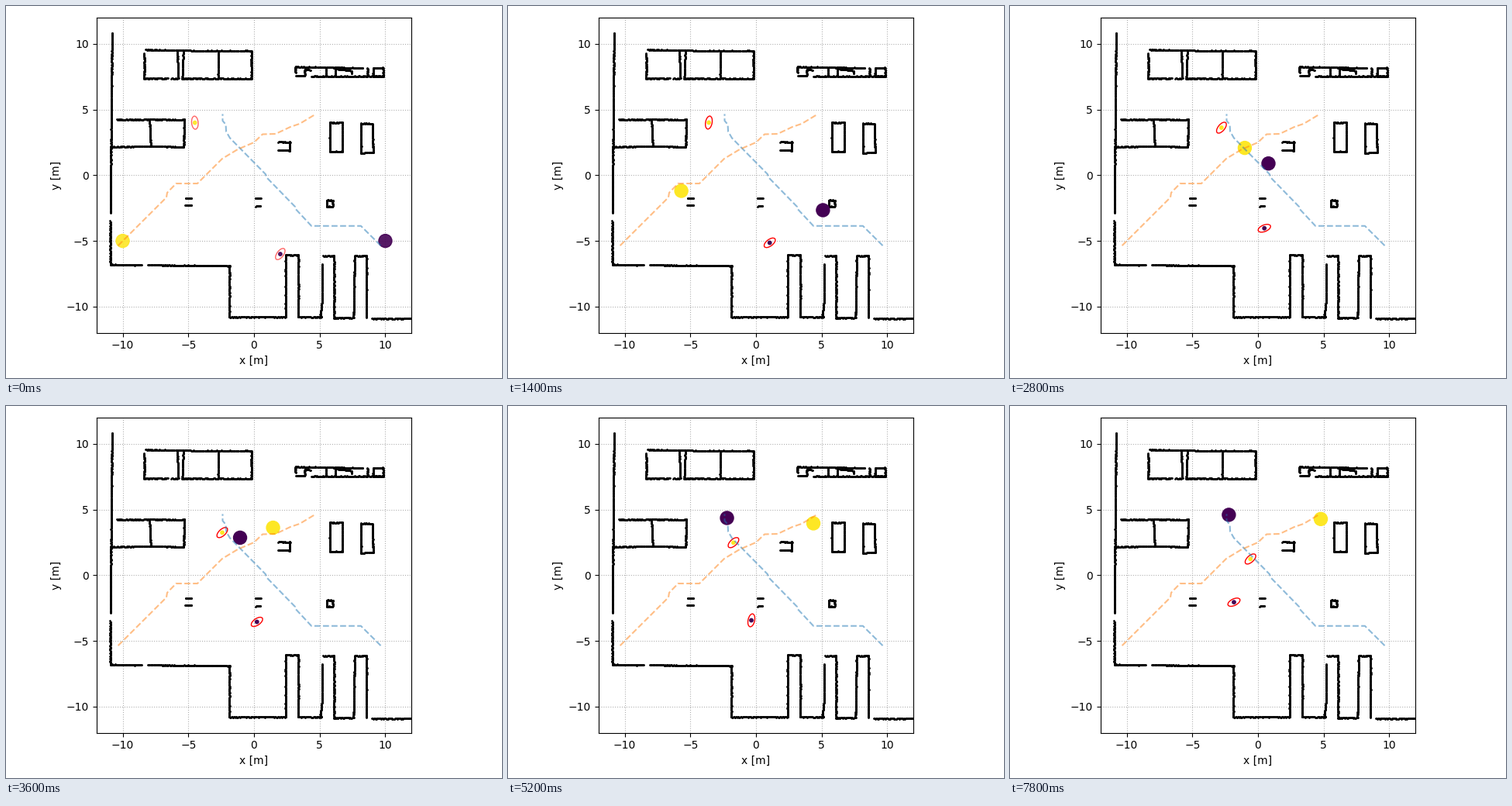
These frames come from a looping animation (640x480 px, 8000 ms). A matplotlib script:

```python
import numpy as np
import matplotlib.pyplot as plt
from matplotlib.animation import FuncAnimation
from matplotlib.patches import Ellipse

FRAMES, STEP = 40, 200
DT = STEP / 1000
TIMES = np.arange(FRAMES) * DT
COLORS = ["#440154", "#fde725"]
rng = np.random.default_rng(4)

fig, ax = plt.subplots(figsize=(6.4, 4.8), dpi=100)
ax.set(xlim=(-12, 12), ylim=(-12, 12), xlabel="x [m]", ylabel="y [m]",
       xticks=range(-10, 11, 5), yticks=range(-10, 11, 5), aspect="equal")
ax.grid(linestyle=":")
ax.set_axisbelow(True)
fig.tight_layout()


# Map: walls are rows of scan dots with a little noise, in metres.
def wall(*corners):
    for a, b in zip(corners, corners[1:]):
        n = int(np.hypot(b[0] - a[0], b[1] - a[1]) / 0.05) + 2
        dots = np.linspace(a, b, n) + rng.normal(0, 0.01, (n, 2))
        ax.scatter(*dots.T, s=1, color="black", zorder=1)


def box(x0, y0, x1, y1):
    wall((x0, y0), (x1, y0), (x1, y1), (x0, y1), (x0, y0))


def rows(x0, x1, *ys):
    for y in ys:
        wall((x0, y), (x1, y))


def outer_walls():
    wall((-10.8, 10.85), (-10.85, 6.4), (-10.93, -2.84))
    wall((-10.94, -3.49), (-10.94, -6.8), (-8.53, -6.84))
    wall((-8.08, -6.84), (-1.87, -6.89), (-1.87, -10.8), (2.4, -10.8),
         (2.4, -6.08), (3.38, -6.08), (3.38, -10.8), (5.13, -10.8),
         (5.05, -10.6), (5.2, -9.5), (5.2, -6.76))
    wall((5.25, -6.14), (6.1, -6.14), (6.1, -10.86), (7.58, -10.86),
         (7.67, -6.14), (8.57, -6.14), (8.57, -10.86))
    rows(9.0, 11.92, -10.92)


def left_rooms():
    wall((-8.25, 9.55), (-5.2, 9.53), (-4.7, 9.48), (-0.2, 9.48),
         (-0.2, 7.36), (-5.5, 7.37))
    wall((-8.35, 9.29), (-8.35, 7.37), (-6.55, 7.37))
    rows(-6.3, -5.75, 7.37)
    for top, bottom in ((-5.83, -5.78), (-5.37, -5.46), (-2.7, -2.74)):
        wall((top, 9.45), (bottom, 7.4))
    wall((-10.45, 4.24), (-5.3, 4.24), (-5.36, 2.15), (-7.86, 2.21),
         (-10.9, 2.17))
    wall((-7.96, 4.15), (-7.86, 2.25))


def right_rooms():
    wall((3.15, 7.8), (3.15, 8.26), (8.29, 8.16))
    wall((3.2, 7.56), (3.86, 7.56), (3.86, 8.1), (4.3, 8.02))
    rows(4.37, 9.83, 7.54)
    box(9.07, 7.53, 9.83, 8.17)
    for x in (5.5, 6.2, 8.64):
        wall((x, 8.17), (x, 7.56))
    wall((6.2, 8.1), (7.43, 7.95), (7.43, 7.75))
    box(5.78, 1.8, 6.72, 4.01)
    wall((8.14, 3.94), (9.0, 3.94), (9.08, 1.75), (8.16, 1.68),
         (8.14, 3.94))
    wall((1.83, 2.53), (2.73, 2.53), (2.73, 1.88), (1.8, 1.91))


def pillars():
    rows(-5.22, -4.75, -1.75, -2.28)
    rows(0.11, 0.5, -1.76, -2.35)
    box(5.53, -2.39, 5.99, -1.9)


def planned_path(color, *points):
    ax.plot(*zip(*points), color=color, ls="--", alpha=0.5, zorder=2)


# Robots: smooth curves through (seconds, x, y), coming to rest at the last.
def robot(*keys):
    t, *coords = np.array(keys).T
    clock = np.minimum(TIMES, t[-1])
    i = np.clip(np.searchsorted(t, clock, "right") - 1, 0, len(t) - 2)
    h = t[i + 1] - t[i]
    u = (clock - t[i]) / h

    def curve(v):
        m = np.gradient(v, t)
        m[-1] = 0
        return ((1 + 2 * u) * (1 - u) ** 2 * v[i] + u ** 2 * (3 - 2 * u) * v[i + 1]
                + h * u * (1 - u) * ((1 - u) * m[i] - u * m[i + 1]))

    return np.column_stack([curve(v) for v in coords])


# Walkers: speed and heading summed over time; the ring lies across the heading.
def walker(start, speed, turns):
    fine = np.arange(FRAMES * 20) * DT / 20
    heading = np.interp(fine, *zip(*turns))
    step = speed(fine) * DT / 20
    angle = np.radians(heading)
    moves = np.column_stack([step * np.cos(angle), step * np.sin(angle)])
    path = start + np.cumsum(moves, axis=0) - moves[0]
    return path[::20], heading[::20] + 90


def steady(t):
    return np.full_like(t, 0.65)


def hesitant(t):
    return 0.92 - 0.6 * np.exp(-((t - 4.5) / 1.3) ** 2)


outer_walls()
left_rooms()
right_rooms()
pillars()
planned_path("C0", (9.65, -5.36), (8.14, -3.86), (4.37, -3.86),
             (3.13, -2.53), (3.13, -2.4), (0.94, -0.15), (0.88, 0.08),
             (-1.83, 2.83), (-2.12, 3.33), (-2.15, 3.86), (-2.39, 4.15),
             (-2.39, 4.66))
planned_path("C1", (-10.35, -5.36), (-6.67, -1.69), (-6.61, -1.33),
             (-5.93, -0.63), (-4.31, -0.63), (-2.42, 1.26), (-1.24, 1.97),
             (0, 2.5), (0.65, 3.12), (1.65, 3.15), (2.77, 3.68),
             (3.48, 3.92), (4.66, 4.63))

robots = [
    robot((0, 10, -5), (0.8, 7.14, -3.84), (2, 3.19, -1.3),
          (3.6, -1.06, 2.86), (4.8, -2.18, 4.19), (5.2, -2.21, 4.36),
          (6.2, -2.22, 4.6)),
    robot((0, -10, -5), (0.8, -7.61, -2.6), (2, -3.72, 0.08),
          (3.6, 1.45, 3.62), (4.8, 4.0, 3.87), (5.2, 4.37, 3.95),
          (6.2, 4.78, 4.28)),
]
walkers = [
    walker((2, -6), hesitant,
           [(0, 143), (0.8, 140), (2, 115), (2.8, 112), (3.6, 125),
            (4.4, 195), (5.2, 168), (6.6, 135), (7.8, 116)]),
    walker((-4.5, 4), steady, [(0, 5), (0.8, 3), (2, -24), (3.2, -47.5)]),
]

big = ax.scatter([0, 0], [0, 0], s=150, c=COLORS, zorder=1.3)
small = ax.scatter([0, 0], [0, 0], s=10, c=COLORS, zorder=1.3)
rings = [ax.add_patch(Ellipse((0, 0), 1, 0.5, fill=False, ec="red", lw=1,
                              zorder=1.4)) for _ in walkers]


def update(frame):
    # Everything is a little faint until the first move.
    solid = frame > 0
    big.set_offsets([path[frame] for path in robots])
    small.set_offsets([path[frame] for path, _ in walkers])
    for dots in (big, small):
        dots.set_alpha(1 if solid else 0.9)
    for ring, (path, tilt) in zip(rings, walkers):
        ring.set_center(path[frame])
        ring.set_angle(tilt[frame])
        ring.set_alpha(1 if solid else 0.6)
    return []


anim = FuncAnimation(fig, update, frames=FRAMES, interval=STEP,
                     init_func=lambda: update(0), repeat=True,
                     repeat_delay=0, blit=False)
plt.show()
```
